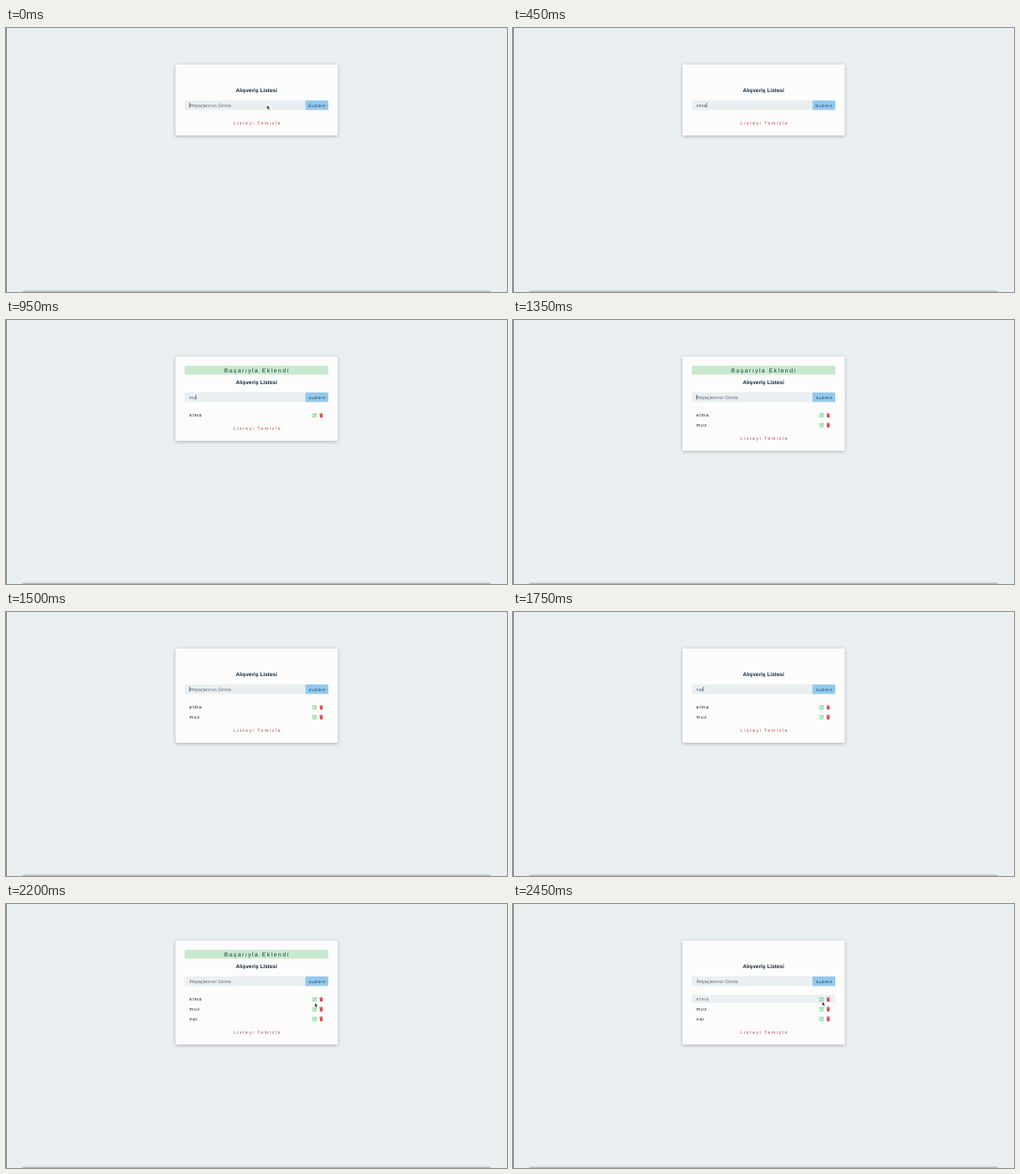
Recreate the animation shown at these times as an HTML page. Size 600 by 317 pixels, loop 2.5 s.

```html
<!DOCTYPE html>
<html lang="tr">
<head>
<meta charset="utf-8">
<title>Alışveriş Listesi</title>
<style>
  html, body { margin: 0; width: 100%; height: 100%; overflow: hidden; background: #eaeff2; }
  svg { display: block; position: absolute; left: 0; top: 0; }
  text {
    font: 5.55px "Liberation Sans", Arial, sans-serif;
    text-rendering: geometricPrecision;
    white-space: pre;
  }
  .title { font-size: 6.5px; font-weight: bold; fill: #0b2a42; text-anchor: middle; }
  .alert { font-size: 6.94px; letter-spacing: 1.45px; fill: #18432a; }
  .button { font-size: 4.86px; letter-spacing: 1px; fill: #12293c; }
  .clear { letter-spacing: 1.46px; fill: #cb4a4a; }
  .item text { letter-spacing: .8px; fill: #14202b; }
  .card { fill: #fcfcfc; filter: drop-shadow(0 1.2px 2px rgba(0, 0, 0, .27)); }
</style>
</head>
<body>
<svg width="600" height="317" viewBox="0 0 600 317">
  <defs>
    <filter id="soft" x="-5%" y="-300%" width="110%" height="700%"><feGaussianBlur stdDeviation="1.5"/></filter>
    <g id="edit">
      <path d="M369.9 112.4h-2.7v4.2h4.2v-2.2" fill="none" stroke="#62d872" stroke-width=".75"/>
      <path d="M368.6 115.5l.3-1.3 2.3-2.4 1 1-2.4 2.4z" fill="#62d872"/>
    </g>
    <path id="trash" fill="#dc4a50" d="M375.4 111.9h1.3l.3-.4h1l.3.4h1.3v.7h-4.2zM375.7 113h3.6l-.25 3.6q0 .5-.5.5h-2.1q-.5 0-.5-.5z"/>
  </defs>
  <rect width="600" height="317" fill="#eaeff2"/>
  <rect width="1" height="317" fill="#7b8286"/>
  <rect x="19" y="317" width="562" height="4" rx="2" fill="#000" opacity=".65" filter="url(#soft)"/>

  <rect id="card" class="card" x="203" y="43.7" width="194.4" rx="1.5"/>
  <g id="alert">
    <rect x="214" y="55" width="172" height="10.6" rx="1.2" fill="#c9e8d0"/>
    <text class="alert" x="261.2" y="62.7">Başarıyla Eklendi</text>
  </g>
  <text class="title" x="300" y="77">Alışveriş Listesi</text>

  <path d="M358.6 87h-143.2q-1.4 0-1.4 1.4v8.7q0 1.4 1.4 1.4h143.2z" fill="#eaeff2"/>
  <path d="M358.6 87h26q1.4 0 1.4 1.4v8.7q0 1.4-1.4 1.4h-26z" fill="#92c9f0"/>
  <text id="field" x="219.6" y="94.6"></text>
  <rect id="caret" y="89.8" width=".6" height="5.7" fill="#1c2b38"/>
  <text id="button" class="button" y="94.5"></text>

  <g id="list"></g>
  <text id="clear" class="clear" x="272.2">Listeyi Temizle</text>
  <path id="mouse" d="M0 0v4.5l1.05-.95.75 1.75.85-.35-.75-1.7h1.4z" fill="#000" stroke="#fff" stroke-width=".35"/>
</svg>
<script>
  const LOOP = 2500, TICK = 50, ROW = 11.8;
  const $ = id => document.getElementById(id);
  const show = (el, on) => el.setAttribute('visibility', on ? 'visible' : 'hidden');

  const typing = [[0, ''], [50, 'e'], [100, 'el'], [200, 'elm'], [450, 'elma'], [550, ''],
    [750, 'm'], [950, 'mu'], [1150, 'muz'], [1300, ''],
    [1600, 'n'], [1700, 'na'], [1750, 'nar'], [1800, '']];
  const added = [['elma', 550], ['muz', 1300], ['nar', 1800]];
  const alerts = [[550, 1500], [1800, 2300]];
  const path = [[0, 312.7, 93], [2050, 313, 95], [2100, 338, 107], [2150, 361, 117],
    [2200, 370, 119], [2250, 370.3, 118.2], [2300, 370.5, 117.5]];

  const latest = (steps, t) => steps.filter(s => s[0] <= t).pop();
  const mix = (a, b, k) => `rgb(${a.map((v, i) => Math.round(v + (b[i] - v) * k))})`;

  const rows = added.map(([name], i) => {
    $('list').insertAdjacentHTML('beforeend', `<g class="item" transform="translate(0 ${i * ROW})">
      <rect x="214" y="109.3" width="172" height="9.8" rx="1.4" fill="#eaeff2" opacity="0"/>
      <text x="219.6" y="116">${name}</text><use href="#edit"/><use href="#trash"/></g>`);
    return $('list').lastElementChild;
  });

  function draw(t) {
    const count = added.filter(a => t >= a[1]).length;
    const grow = count ? 16 + (count - 1) * ROW : 0;
    $('card').setAttribute('height', 85.4 + grow);
    $('clear').setAttribute('y', 116.1 + grow);
    rows.forEach((row, i) => show(row, i < count));
    show($('alert'), alerts.some(([from, to]) => t >= from && t < to));

    const value = latest(typing, t)[1], field = $('field');
    field.textContent = value || 'İhtiyaçlarınızı Giriniz.';
    field.style.fill = value ? '#4c6580' : '#566775';
    $('caret').setAttribute('x', 219.6 + (value ? field.getComputedTextLength() : 0));
    show($('caret'), t < 2100);

    $('button').textContent = count ? 'submit' : 'Submit';
    $('button').setAttribute('x', count ? 362.8 : 362.1);

    const hover = Math.min(1, Math.max(0, (t - 2250) / 150));
    rows[0].querySelector('rect').setAttribute('opacity', hover);
    rows[0].querySelector('text').style.fill = mix([20, 32, 43], [88, 108, 126], hover);

    const [, x, y] = latest(path, t);
    $('mouse').setAttribute('transform', `translate(${x} ${y})`);
    show($('mouse'), t < 50 || t >= 2050);
  }

  const start = performance.now();
  function frame() {
    const t = (performance.now() - start) % LOOP;
    draw(Math.floor(t / TICK) * TICK);
    requestAnimationFrame(frame);
  }
  frame();
</script>
</body>
</html>
```
